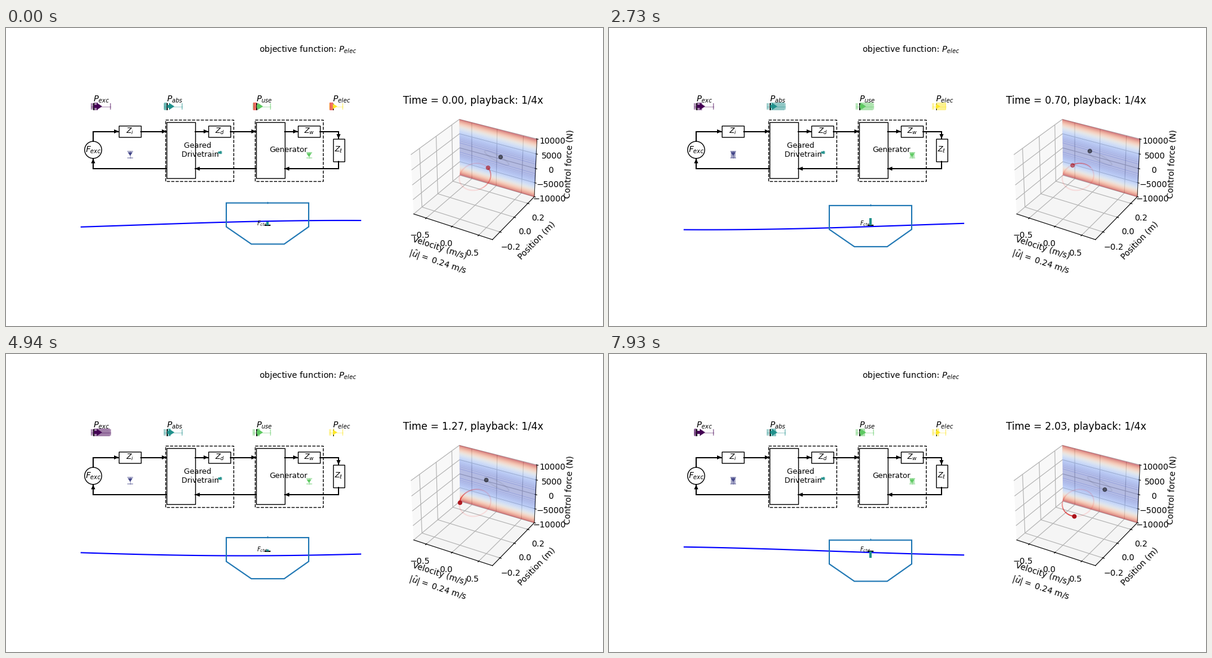
These frames come from a looping animation (1000x500 px, 8000 ms). A matplotlib script:

```python
import numpy as np
import matplotlib.pyplot as plt
from matplotlib.animation import FuncAnimation
from matplotlib.gridspec import GridSpec
from matplotlib.patches import Circle, Polygon, Rectangle
from mpl_toolkits.mplot3d.art3d import Line3DCollection, Poly3DCollection

FRAMES, LOOP_MS, FPS = 62, 8000, 30
W = 2 * np.pi * 0.3          # wave frequency, rad/s
PHASE = 1.275
SPEED = 0.24                 # velocity amplitude, m/s
FORCE = 1600                 # control force amplitude, N
TRAIL = 1.1                  # trail length, s

plt.rcParams["font.family"] = "DejaVu Sans"
fig = plt.figure(figsize=(10, 5), dpi=100)
ax = fig.add_axes([0, 0, 1, 1])
ax.set(xlim=(0, 1000), ylim=(500, 0))
ax.axis("off")


# ---------- motion ----------
def velocity(t):
    return SPEED * np.cos(W * t + PHASE)


def position(t):
    return SPEED / W * np.sin(W * t + PHASE)


def force(t):
    return FORCE * np.cos(W * (t - 0.565))


def power(t, mean, amp, peak):
    return mean + amp * np.cos(2 * W * (t - peak))


# ---------- drawing helpers ----------
def line(pts, color="black", lw=1.4, **kw):
    x, y = zip(*pts)
    return ax.plot(x, y, color=color, lw=lw, **kw)[0]


def box(x0, y0, x1, y1, **kw):
    style = dict(fc="none", ec="black", lw=1)
    style.update(kw)
    return ax.add_patch(Rectangle((x0, y0), x1 - x0, y1 - y0, **style))


def label(x, y, text, size=10, ha="center", va="center", **kw):
    return ax.text(x, y, text, fontsize=size, ha=ha, va=va, **kw)


def head(x, y, dx, dy, length=8, half=3.4, color="black", z=4):
    """Filled triangle with its tip at x, y, pointing along dx, dy."""
    bx, by = x - dx * length, y - dy * length
    pts = [(x, y), (bx - dy * half, by + dx * half), (bx + dy * half, by - dx * half)]
    ax.add_patch(Polygon(pts, fc=color, ec="none", zorder=z))


def wire(*pts):
    line(pts, solid_joinstyle="miter")
    (x0, y0), (x1, y1) = pts[-2:]
    head(x1, y1, np.sign(x1 - x0), np.sign(y1 - y0))


# ---------- circuit ----------
label(424.5, 40, "objective function: $P_{elec}$", ha="left", va="baseline")

ax.add_patch(Circle((146, 204.5), 14.3, fc="none", ec="black", lw=1))
label(146.5, 204.5, "$F_{exc}$")
TOP, BOTTOM = 173.5, 236
wire((146, 190), (146, TOP), (189, TOP))
for x, name in ((189, "i"), (339, "d"), (489, "w")):
    box(x, 164, x + 37, 183)
    label(x + 18.75, TOP, f"$Z_{name}$", 9)
for x in (269, 419):
    box(x - 2.5, 153.5, x + 111.5, 256.5, ls="--")
    box(x, 158, x + 47.5, 252)
    wire((x - 43, TOP), (x, TOP))
    wire((x + 47.5, TOP), (x + 70, TOP))
wire((526, TOP), (557, TOP), (557, 186))
box(547.5, 186, 566.5, 224)
label(557, 204.5, r"$Z_\ell$", 9)
wire((557, 224), (557, BOTTOM), (466.5, BOTTOM))
wire((419, BOTTOM), (316.5, BOTTOM))
wire((269, BOTTOM), (146, BOTTOM), (146, 219))
label(322.75, 204.8, "Geared \n Drivetrain", 9)
label(473.5, 208.5, "Generator", 9, va="baseline")

# ---------- power gauges ----------
viridis = plt.get_cmap("viridis")
PURPLE, NAVY, TEAL, GREEN, YELLOW = (viridis(v) for v in (0, 0.2, 0.5, 0.75, 1.0))
RED = (0.93, 0.26, 0.22)
ROW = 131.5


class Gauge:
    def __init__(self, name, zero, color, mean, amp, peak, text_x):
        self.zero, self.color = zero, color
        self.wave = mean, amp, peak
        low, high = zero + mean - amp, zero + mean + amp
        label(text_x, 124, f"$P_{{{name}}}$", ha="left", va="baseline")
        line([(low, ROW), (high, ROW)], color, 1, alpha=0.35)
        for x in (low, low + 2, high):
            line([(x, ROW - 4.5), (x, ROW + 4.5)], color, 1.2, alpha=0.5)
        bold = name != "elec"
        line([(zero, ROW - 5), (zero, ROW + 5)], lw=1.3 if bold else 0.8, zorder=3)
        tip = zero + mean + 2
        neck = max(zero, tip - 9)
        box(zero, ROW - 2.5, neck + 0.5, ROW + 2.5, fc=color, ec="none", zorder=4)
        head(tip, ROW, 1, 0, tip - neck, 6 if bold else 4.5, color)
        self.bar = box(zero, ROW - 6.5, zero, ROW + 6.5, ec="none", alpha=0.5, zorder=2)

    def update(self, t):
        p = power(t, *self.wave)
        self.bar.set_x(self.zero + min(p, 0))
        self.bar.set_width(abs(p))
        negative = p < 0 and self.color in (GREEN, YELLOW)
        self.bar.set_facecolor(RED if negative else self.color)
        self.bar.set_alpha(0.75 if negative else 0.5)


gauges = [
    Gauge("exc", 147, PURPLE, 12, 16, 1.164, 146),
    Gauge("abs", 269.5, TEAL, 10.5, 15, 0.777, 269),
    Gauge("use", 419.5, GREEN, 9, 14.5, 0.777, 419),
    Gauge("elec", 547.5, YELLOW, 5.5, 11, 0.777, 547),
]


def loss_gauge(x, top, bottom, color):
    line([(x, top), (x, bottom)], color, 1, alpha=0.4)
    for y in (top, bottom):
        line([(x - 4, y), (x + 4, y)], color, 1.2, alpha=0.5)
    head(x, top + 8, 0, 1, 6, 4, color)
    return box(x - 4, top, x + 4, top, fc=color, ec="none", alpha=0.45, zorder=2)


loss_in = loss_gauge(208, 206.5, 217.5, NAVY)
loss_gen = loss_gauge(507.5, 208.5, 217.5, GREEN)
box(354.5, 206.5, 362, 211, fc=TEAL, ec="none", alpha=0.6, zorder=3)
head(354.5, 208.8, -1, 0, 6, 3, TEAL)

# ---------- wave and buoy ----------
wave_x = np.linspace(125, 595, 95)
wave, = ax.plot(wave_x, wave_x, color="blue", lw=1.5, solid_capstyle="butt")
HULL = np.array([(369, 0), (507, 0), (507, 40), (466, 69), (411, 69), (369, 40)])
hull = ax.add_patch(Polygon(HULL, fc="none", ec="tab:blue", lw=1.5, zorder=3))
mast, = ax.plot([438, 438], [0, 0], color="tab:blue", lw=1, zorder=3)
label(419.5, 331, "$F_{ctrl}$", 7, ha="left", va="baseline", zorder=3)
line([(434, 330.7), (442, 330.7)], lw=1.5, zorder=4)
force_bar = box(436, 330.7, 440, 330.7, fc=TEAL, ec="none", zorder=5)

# ---------- phase plot ----------
grid = GridSpec(1, 2, width_ratios=[2, 1], left=0.125, right=0.9,
                bottom=0.11, top=0.88, wspace=0.2, figure=fig)
ax3 = fig.add_subplot(grid[1], projection="3d", computed_zorder=False)
VMAX, PMAX, FMAX = 0.75, 0.3, 10000

coolwarm = plt.get_cmap("coolwarm")
N = 36
xs = np.array([-VMAX, VMAX])


def level(k, sign):
    z = sign * np.sqrt(k / N) - 0.015 * xs / VMAX
    if k == N:
        z = sign * np.ones(2)
    return [(x, PMAX, f) for x, f in zip(xs, FMAX * np.clip(z, -1, 1))]


bands, band_colors = [], []
for side in (1, -1):
    for k in range(N):
        bands.append(level(k, side) + level(k + 1, side)[::-1])
        band_colors.append(coolwarm((k + 0.5) / N)[:3] + (0.34,))
ax3.add_collection3d(Poly3DCollection(bands, facecolors=band_colors,
                                      edgecolors="none", linewidths=0, zorder=1))
edges = [level(k, s) for s in (1, -1) for k in range(1, N)]
edge_colors = [coolwarm(k / N)[:3] + (0.4,) for s in (1, -1) for k in range(1, N)]
ax3.add_collection3d(Line3DCollection(edges, colors=edge_colors, linewidths=0.5, zorder=2))

cycle = np.linspace(0, 2 * np.pi / W, 90)
ax3.plot(velocity(cycle), np.full(90, PMAX), force(cycle), color="black",
         alpha=0.06, lw=1.5, zorder=3)
ax3.plot(velocity(cycle), position(cycle), force(cycle), color="red",
         alpha=0.1, lw=1.5, zorder=4)
shadow, = ax3.plot([0], [0], [0], "o", ms=4.5, color="black", alpha=0.5, zorder=5)
dot, = ax3.plot([0], [0], [0], "o", ms=4.5, color=(0.67, 0.07, 0.1), zorder=7)
trail = Line3DCollection([[(0, 0, 0), (0, 0, 0)]], linewidths=1.2, zorder=6)
ax3.add_collection3d(trail)

ax3.set(xlim=(-VMAX, VMAX), ylim=(-PMAX, PMAX), zlim=(-FMAX, FMAX))
ax3.set_xticks([-0.5, 0, 0.5])
ax3.set_yticks([-0.2, 0, 0.2])
ax3.set_zticks(range(-10000, 10001, 5000))
ax3.set_xlabel("Velocity (m/s) \n" + r" $|\hat{u}| =$ 0.24 m/s", linespacing=1.35)
ax3.set_ylabel("Position (m)")
ax3.set_zlabel("Control force (N)")
title = ax3.set_title("")


def depth_fade(t):
    return np.clip(0.75 - 0.4 * np.sin(W * t + PHASE), 0.55, 1)


def draw_trail(t):
    # the first step still shows the end of the previous run
    start = -TRAIL if t == 0 else max(0, t - TRAIL)
    ts = np.linspace(start, t, 40)
    pts = np.column_stack([velocity(ts), position(ts), force(ts)])
    colors = np.tile([0.85, 0.1, 0.1, 1.0], (39, 1))
    colors[:, 3] = depth_fade(ts[1:]) * (1 - (t - ts[1:]) / TRAIL)
    trail.set_segments(list(np.stack([pts[:-1], pts[1:]], axis=1)))
    trail.set_color(colors)


def update(k):
    t = k / FPS
    v, p, f = velocity(t), position(t), force(t)
    for g in gauges:
        g.update(t)
    surplus = power(t, *gauges[1].wave) - power(t, *gauges[0].wave)
    loss_in.set_height(11 * np.clip(surplus / 14, 0, 1))
    loss_gen.set_height(9.5 * (f / FORCE) ** 2)

    wave.set_ydata(330.7 - 7.8 * np.cos(0.0045 * (wave_x - 566) - W * t))
    top = 303.1 - 10 * np.sin(W * t + PHASE)
    hull.set_xy(HULL + [0, top])
    mast.set_ydata([top - 2, top])
    force_bar.set_height(-12 * f / FORCE)

    title.set_text(f"Time = {t:.2f}, playback: 1/4x")
    shadow.set_data_3d([v], [PMAX], [f])
    dot.set_data_3d([v], [p], [f])
    dot.set_alpha(depth_fade(t))
    draw_trail(t)
    return []


anim = FuncAnimation(fig, update, frames=FRAMES, interval=LOOP_MS / FRAMES,
                     repeat=True, repeat_delay=0, blit=False, cache_frame_data=False)
plt.show()
```
